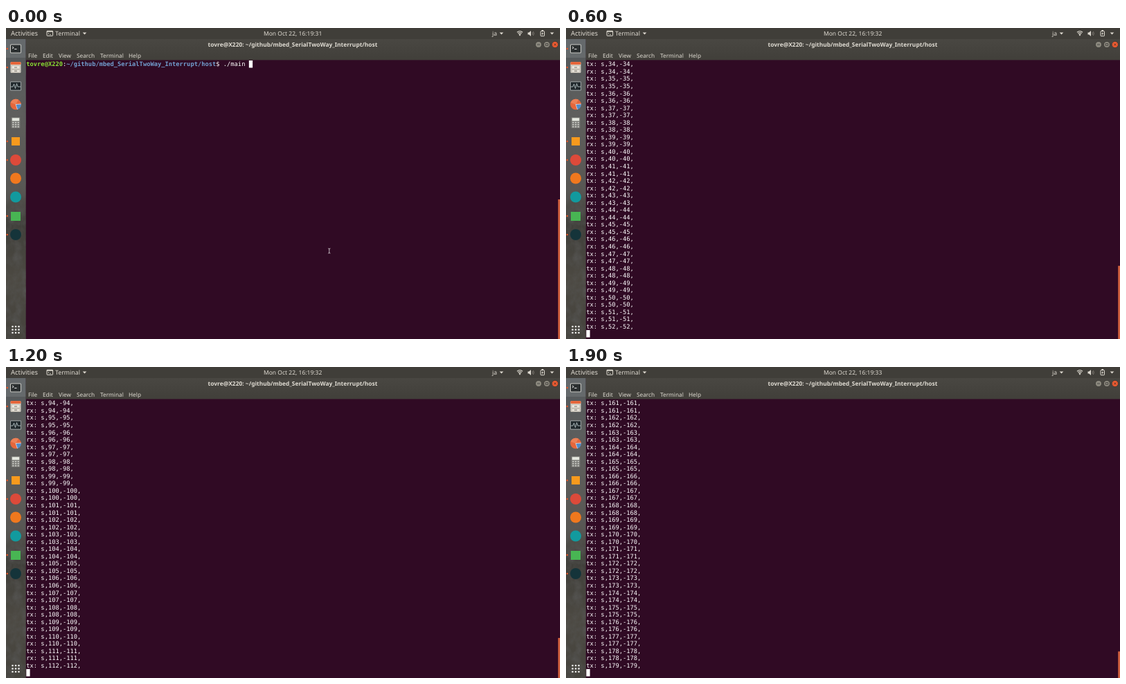
Recreate the animation shown at these times as an HTML page. Size 800 by 450 pixels, loop 2 s.

```html
<!DOCTYPE html>
<html lang="en">
<head>
<meta charset="utf-8">
<title>Serial echo in a terminal</title>
<style>
  html, body { margin: 0; width: 100%; height: 100%; overflow: hidden; background: #300a24; }
  svg { display: block; width: 800px; height: 450px; }
  text { white-space: pre; text-rendering: geometricPrecision; }
  .ui { font-family: "Noto Sans", "Open Sans", sans-serif; fill: #dfdbd2; }
  .bar { font-size: 8.6px; }
  .menu { font-size: 8.25px; }
  .title { font-size: 8.42px; font-weight: bold; text-anchor: middle; }
  .mono { font: 8.755px "DejaVu Sans Mono", monospace; fill: #fff; }
  .bold { font-weight: bold; }
</style>
</head>
<body>
<svg viewBox="0 0 800 450">
  <defs>
    <linearGradient id="titleShade" x2="0" y2="1">
      <stop stop-color="#494742"/><stop offset="1" stop-color="#413f3a"/>
    </linearGradient>
    <linearGradient id="rock" x2="0" y2="1">
      <stop stop-color="#53585c"/>
      <stop offset=".25" stop-color="#5f5f5d"/>
      <stop offset=".5" stop-color="#585652"/>
      <stop offset=".62" stop-color="#403f3a"/>
      <stop offset=".8" stop-color="#4c4942"/>
      <stop offset="1" stop-color="#45433d"/>
    </linearGradient>
    <filter id="grain" x="0" y="0" width="1" height="1">
      <feTurbulence type="fractalNoise" baseFrequency=".09 .07" numOctaves="4" seed="4"/>
      <feColorMatrix values="0 0 0 0 .1  0 0 0 0 .1  0 0 0 0 .1  1.3 0 0 0 -.5"/>
    </filter>
    <path id="chevron" d="M-2.8-1.4H2.8L0 1.6Z" fill="#dfdbd2"/>
  </defs>

  <rect width="800" height="450" fill="#300a24"/>

  <!-- dock -->
  <rect y="15" width="28.7" height="435" fill="url(#rock)"/>
  <rect y="15" width="28.7" height="435" filter="url(#grain)"/>
  <rect y="16" width="28.5" height="27" fill="#7d8386" opacity=".4"/>
  <g id="running" fill="#e2582c"></g>

  <g transform="translate(14 30)">
    <rect x="-8" y="-6.5" width="16" height="13" rx="1.5" fill="#c9c9c4"/>
    <rect x="-7" y="-5.5" width="14" height="11" rx=".7" fill="#2b2f30"/>
    <path d="M-5-3L-2.8-1.5L-5 0M-1.8.5H1.5" fill="none" stroke="#fff" stroke-width=".9"/>
  </g>
  <g transform="translate(14 57)">
    <rect x="-7.5" y="-8" width="15" height="16" rx="1.5" fill="#d9d4c9"/>
    <rect x="-7.5" y="-8" width="15" height="4" rx="1.5" fill="#e7673b"/>
    <path d="M-6-2.5H6V2H-6ZM-6 3.5H6V7H-6Z" fill="#ebe7de" stroke="#a9a397" stroke-width=".6"/>
    <path d="M-2 0H2M-2 5.2H2" stroke="#77736a"/>
  </g>
  <g transform="translate(14 84)">
    <rect x="-8" y="-6.5" width="16" height="13" rx="1.2" fill="#b9bfc0"/>
    <rect x="-7.2" y="-5.7" width="14.4" height="11.4" fill="#20282c"/>
    <path d="M-7 1H-4L-2.5-3L-.5 3.5L1.5-3.5L3 1H7" fill="none" stroke="#c4d2d5" stroke-width=".8"/>
  </g>
  <g transform="translate(14 110.5)">
    <circle r="7.8" fill="#e5673c"/>
    <path d="M0 0L-7.4-2.5A7.8 7.8 0 0 1 4-6.7Z" fill="#ec8157"/>
    <path d="M0 0L7.8-.5A7.8 7.8 0 0 1 2.5 7.4Z" fill="#4d8ccb"/>
    <path d="M0 0L7.8-.5M0 0L2.5 7.4" stroke="#eee" stroke-width=".7"/>
  </g>
  <g transform="translate(14 137)">
    <rect x="-6.5" y="-8" width="13" height="16" rx="1.3" fill="#777773"/>
    <rect x="-5.2" y="-6.8" width="10.4" height="4.3" fill="#e5e8df"/>
    <path d="M-4.8-.2H5M-4.8 2.8H5M-4.8 5.8H5" stroke="#c6c7c2" stroke-width="1.7" stroke-dasharray="2.3 1.4"/>
  </g>
  <rect x="8" y="158" width="12" height="12" fill="#f79a1d"/>
  <circle cx="14" cy="191" r="8" fill="#dc4a3a"/>
  <circle cx="14" cy="217.5" r="8" fill="#f0781e"/>
  <circle cx="14" cy="244.5" r="8" fill="#129a9e"/>
  <rect x="7" y="266" width="14" height="13" fill="#48b553"/>
  <circle cx="14" cy="299" r="8" fill="#15343a"/>
  <g id="apps" fill="#eeeeec"></g>

  <!-- top panel -->
  <rect width="800" height="16" fill="#403e39"/>
  <g class="ui bar">
    <text x="7" y="11" font-size="9.4">Activities</text>
    <text x="71" y="11" font-size="8.8">Terminal</text>
    <text id="clock" x="372" y="11" font-size="8.5"></text>
    <text x="702" y="11">ja</text>
  </g>
  <use href="#chevron" x="113.5" y="8"/>
  <use href="#chevron" x="715.5" y="8"/>
  <use href="#chevron" x="788.5" y="8"/>
  <g fill="none" stroke="#dfdbd2">
    <rect x="59" y="4.3" width="8.6" height="7" rx=".6"/>
    <path d="M59 4.9H67.6" stroke-width="1.6"/>
    <path d="M60.8 7L62 8L60.8 9M63 9.4H65" stroke-width=".7"/>
    <path d="M738 6.2Q742 2.8 746 6.2M739.5 8Q742 5.8 744.5 8" stroke-width="1.2"/>
    <path d="M759.7 6Q761 8 759.7 10M761.4 5Q763.3 8 761.4 11" stroke-width=".8" opacity=".45"/>
    <rect x="772" y="4.5" width="5.5" height="7.2" rx=".8"/>
    <path d="M773.5 3.6H776" stroke-width="1.2"/>
  </g>
  <path d="M740.3 9L742 11.8L743.7 9Q742 7.8 740.3 9ZM753.5 6.5H755.3L758 4V12L755.3 9.5H753.5ZM775.4 5.6L773.2 8.5H774.6L774 10.8L776.4 7.6H775Z" fill="#dfdbd2"/>

  <!-- window frame -->
  <rect x="28.7" y="16" width="772" height="30.4" fill="url(#titleShade)"/>
  <text class="ui title" x="414" y="27">tovre@X220: ~/github/mbed_SerialTwoWay_Interrupt/host</text>
  <g class="ui menu">
    <text x="32" y="42.7">File</text><text x="53" y="42.7">Edit</text>
    <text x="76" y="42.7">View</text><text x="102" y="42.7">Search</text>
    <text x="136" y="42.7">Terminal</text><text x="177" y="42.7">Help</text>
  </g>
  <g stroke="#33322e" stroke-width=".7">
    <circle cx="769" cy="24" r="4.6" fill="#8a877d"/>
    <circle cx="781" cy="24" r="4.6" fill="#8a877d"/>
    <circle cx="792.8" cy="24" r="4.6" fill="#ea5a31"/>
    <path d="M767 24H771M779.2 22.6H782.8V25.4H779.2ZM791.3 22.5L794.3 25.5M794.3 22.5L791.3 25.5" fill="none"/>
  </g>

  <!-- terminal contents -->
  <g id="screen" class="mono"></g>
  <rect id="cursor" width="5.3" height="10.5" fill="#fff"/>
  <rect id="thumb" x="797.2" width="2.8" fill="#cf5f3e"/>
  <path id="pointer" d="M465.2 319Q466.8 319 466.8 320V325Q466.8 326 465.2 326M468.4 319Q466.8 319 466.8 320M466.8 325Q466.8 326 468.4 326" fill="none" stroke="#d5cfd3" stroke-width=".9"/>
</svg>
<script>
const LOOP = 2000, STEP = 100;
const ROWS = 38, LEFT = 29.3, TOP = 47, LINE = 10.543, CHAR = 5.271, BASELINE = 8.4;
const PROMPT = [["tovre@X220", "#8ae234"], [":", "#fff"],
  ["~/github/mbed_SerialTwoWay_Interrupt/host", "#729fcf"], ["$ ./main ", "#fff"]];
// [step, latest value sent]
const PROGRESS = [[1, 3], [4, 33], [6, 52], [9, 82], [12, 112], [16, 151], [19, 179]];

const $ = id => document.getElementById(id);
function add(parent, tag, attrs, content = "") {
  const node = document.createElementNS("http://www.w3.org/2000/svg", tag);
  for (const name in attrs) node.setAttribute(name, attrs[name]);
  node.textContent = content;
  return parent.appendChild(node);
}

for (const y of [30, 57, 164, 191, 272, 299]) add($("running"), "circle", { cx: 1.8, cy: y, r: 1.3 });
for (let i = 0; i < 9; i++)
  add($("apps"), "circle", { cx: 9.5 + i % 3 * 4.5, cy: 432 + Math.floor(i / 3) * 4.5, r: 1.3 });

const prompt = add($("screen"), "text", { x: LEFT, y: TOP + BASELINE });
for (const [part, fill] of PROMPT)
  add(prompt, "tspan", { fill, class: part.length > 9 ? "bold" : "" }, part);
const promptLength = prompt.textContent.length;
const rows = Array.from({ length: ROWS }, (_, i) =>
  add($("screen"), "text", { x: LEFT, y: TOP + i * LINE + BASELINE }));

function latestValue(step) {
  const i = PROGRESS.findIndex(([s]) => s >= step);
  const [s1, v1] = PROGRESS[i];
  if (i === 0) return v1;
  const [s0, v0] = PROGRESS[i - 1];
  return Math.round(v0 + (v1 - v0) * (step - s0) / (s1 - s0));
}

function message(index) {
  const value = index >> 1;
  return `${index % 2 ? "rx" : "tx"}: s,${value},${-value},`;
}

function draw(step) {
  const idle = step === 0;
  const sent = idle ? 0 : 2 * latestValue(step) + 1;
  const lines = sent + (idle ? 1 : 2);          // prompt, messages, cursor line
  const first = Math.max(0, lines - ROWS);
  rows.forEach((row, i) => {
    const index = first + i - 1;
    row.textContent = index >= 0 && index < sent ? message(index) : "";
  });
  prompt.style.display = first ? "none" : "";

  $("cursor").setAttribute("x", LEFT + (idle ? promptLength * CHAR : 0));
  $("cursor").setAttribute("y", TOP + (lines - 1 - first) * LINE);
  $("pointer").style.display = idle ? "" : "none";

  const thumb = 404 * ROWS / (ROWS + Math.max(ROWS, lines));
  $("thumb").setAttribute("y", 450 - thumb);
  $("thumb").setAttribute("height", thumb);
  $("clock").textContent = "Mon Oct 22, 16:19:" + (step < 3 ? 31 : step < 13 ? 32 : 33);
}

const start = performance.now();
let shown = -1;
function tick() {
  const step = Math.floor((performance.now() - start) % LOOP / STEP);
  if (step !== shown) draw(shown = step);
  requestAnimationFrame(tick);
}
tick();
</script>
</body>
</html>
```
